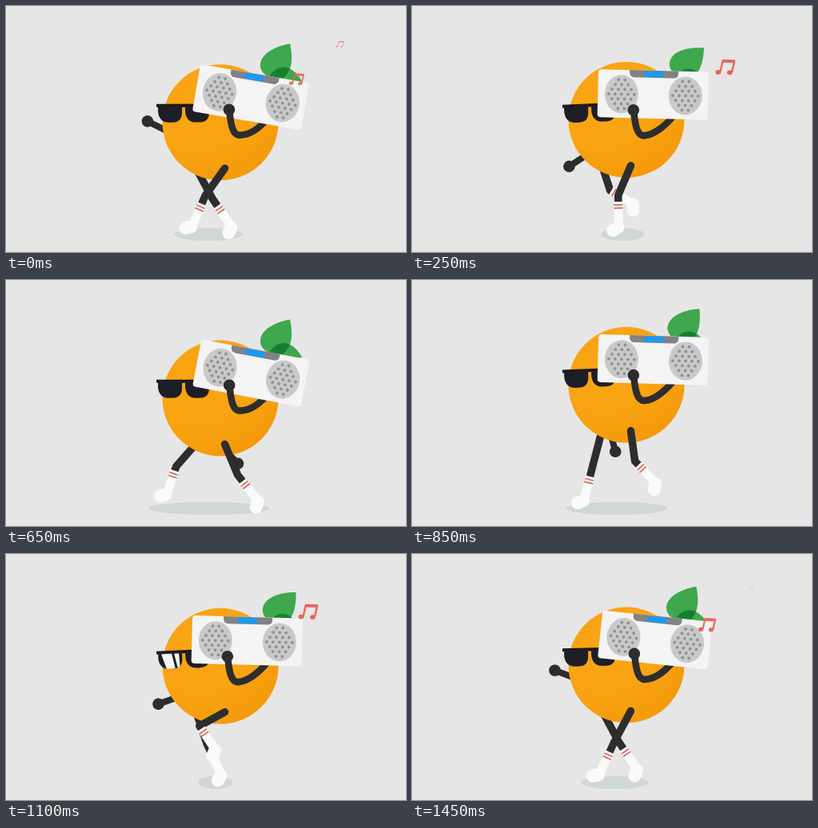
Write an HTML page with a canvas that moves like this. It is 500 px wide and 308 px high and loops after 1.5 s.

```html
<!DOCTYPE html>
<html lang="en">
<head>
<meta charset="utf-8">
<title>Walking orange</title>
<style>
html, body { margin: 0; width: 100%; height: 100%; overflow: hidden; background: #e6e6e6; }
canvas { display: block; }
</style>
</head>
<body>
<canvas id="stage" width="500" height="308"></canvas>
<script>
const ctx = document.getElementById('stage').getContext('2d');
const LOOP = 1500, STEP = 50, STRIDE = 1400;
const DARK = '#2d2d2e', RED = '#e8655c', WHITE = '#fafafa';

const { PI, sin, cos, hypot, atan2, min, max } = Math;
const turn = (t, period) => 2 * PI * t / period;
// Rises from 0 to 1 and back once per step, peaking at the given time.
const pulse = (t, peak, sharpness) =>
  ((1 + cos(turn(t - peak, STRIDE / 2))) / 2) ** sharpness;

function at(x, y, degrees, draw) {
  ctx.save();
  ctx.translate(x, y);
  ctx.rotate(degrees * PI / 180);
  draw();
  ctx.restore();
}

function ellipse(x, y, rx, ry, color) {
  ctx.fillStyle = color;
  ctx.beginPath();
  ctx.ellipse(x, y, rx, ry, 0, 0, 2 * PI);
  ctx.fill();
}

function stroke(path, color, width, cap = 'round') {
  ctx.strokeStyle = color;
  ctx.lineWidth = width;
  ctx.lineCap = cap;
  ctx.lineJoin = 'round';
  ctx.stroke(new Path2D(path));
}

function fill(path, color) {
  ctx.fillStyle = color;
  ctx.fill(new Path2D(path));
}

// Foot position: time counts from contact; snap sharpens the forward swing.
function foot(time, x, snap) {
  const a = turn(time, STRIDE), c = cos(a);
  return { x: x - 42 * c - snap * c * c, y: 277 - 33 * max(0, -sin(a)) };
}

function leg(hipX, hipY, { x, y }, bend) {
  const dx = x - hipX, dy = y - hipY, d = hypot(dx, dy);
  const out = max(0, 92 - d) * bend;
  const kneeX = hipX + dx / 2 - dy / d * out, kneeY = hipY + dy / 2 + dx / d * out;
  stroke(`M${hipX},${hipY}L${kneeX},${kneeY}L${x},${y}`, DARK, 9.5);
  at(x, y, atan2(y - kneeY, x - kneeX) * 180 / PI - 90, () => {
    stroke('M0,-32V0', WHITE, 11, 'butt');
    stroke('M-1,0L-7,4', WHITE, 16);
    stroke('M-5.5,-28H5.5M-5.5,-24H5.5', '#d9665f', 1.7, 'butt');
  });
}

function swingingArm(x, y, t) {
  const swing = cos(turn(t + 45, STRIDE));
  const angle = (37 + 81 * swing) * PI / 180, reach = 52 + 20 * swing ** 4;
  const handX = x - reach * sin(angle), handY = y + reach * cos(angle);
  stroke(`M${x},${y}L${handX},${handY}`, DARK, 8);
  ellipse(handX, handY, 7.3, 7.3, DARK);
}

function orange(y) {
  const skin = ctx.createRadialGradient(240, y - 40, 70, 240, y - 40, 125);
  skin.addColorStop(0, '#f9a413');
  skin.addColorStop(1, '#f4990a');
  ellipse(268, y, 72.5, 72.5, skin);
}

function leaves(y, tilt) {
  at(340, y, tilt, () => {
    const big = new Path2D('M2,4C-34,-2 -30,-34 15,-42C20,-18 16,-4 2,4Z');
    const small = new Path2D('M-10,-2C0,-18 18,-16 30,5C18,12 0,8 -10,-2Z');
    ctx.fillStyle = '#3fa74d';
    ctx.fill(big);
    ctx.fill(small);
    ctx.clip(big);
    ctx.fillStyle = '#14802f';
    ctx.fill(small);
  });
}

function glasses(y, tilt, shine) {
  at(220, y, tilt, () => {
    stroke('M-32,0H32', '#17171b', 4, 'butt');
    for (const x of [0, 34]) at(x, 0, 0, () => {
      const lens = new Path2D('M-30,0H0V8C0,18 -5,21 -13,21H-17C-25,21 -29,16 -30,8Z');
      ctx.fillStyle = '#1e1e26';
      ctx.fill(lens);
      ctx.clip(lens);
      ctx.translate(shine - x, 0);
      fill('M-26,2H-13L-9,21H-20ZM-10,2H-4L-3,21H-6Z', '#f5f5f5');
    });
  });
}

function speaker(x) {
  ellipse(x, 0.5, 21, 24, '#c9c9c9');
  for (let row = -3; row <= 3; row++)
    for (let col = -2; col <= 2; col++) {
      const dx = (col + (row % 2 ? 0.5 : 0)) * 8, dy = row * 6;
      if (hypot(dx / 18, dy / 21) < 1) ellipse(x + dx, dy + 0.5, 1.9, 1.9, '#909090');
    }
}

function boombox() {
  ctx.fillStyle = '#f4f4f4';
  ctx.beginPath();
  ctx.roundRect(-69, -30, 138, 60, 4);
  ctx.fill();
  fill('M-30,-30H31V-26Q30,-21 25,-21H-24Q-29,-21 -30,-26Z', '#828284');
  fill('M-12,-29H12V-22H-12Z', '#169cf4');
  speaker(-39.5);
  speaker(40.5);
}

function carry(cy, tilt) {
  const x = 300.5 + tilt * 0.55, y = cy - 31.5, a = tilt * PI / 180;
  const gripX = x - 24 * cos(a) - 20 * sin(a), gripY = y - 24 * sin(a) + 20 * cos(a);
  const low = gripY + 32, elbow = `${gripX + 13},${low}`;
  stroke(`M${elbow}C${gripX + 22},${low} 313,${cy + 12} 327,${cy - 5}`, DARK, 8.5);
  at(x, y, tilt, boombox);
  stroke(`M${gripX},${gripY}C${gripX + 2},${gripY + 14} ${gripX + 3},${low} ${elbow}`, DARK, 8.5);
  ellipse(gripX, gripY, 7.3, 7.3, DARK);
}

function note(time, start, life, x, y, vx, vy) {
  const age = (time - start + STRIDE) % STRIDE;
  if (age >= life) return;
  const size = sin(PI * age / life);
  at(x + vx * age, y - vy * age, 2, () => {
    ctx.globalAlpha = min(1, size * 1.15);
    ctx.scale(size * 0.93, size * 0.93);
    stroke('M-6,7L-3,-8.5H13L10,7', RED, 2.6);
    stroke('M-3,-7.5H13', RED, 4, 'butt');
    ellipse(-9, 8, 3.8, 3.2, RED);
    ellipse(7, 8, 3.8, 3.2, RED);
  });
}

function draw(time) {
  const t = time % STRIDE;
  const cy = 140 + 7.5 * cos(turn(t + 40, STRIDE / 4)) - 1.5 * sin(turn(t, STRIDE / 2));
  const tilt = 1.5 + 9.5 * pulse(t, -35, 5);
  const leafTilt = 16 * pulse(t, 300, 2);
  const front = foot(t + 15, 274, 0), back = foot(t + 695, 262, 22);
  const left = min(front.x, back.x) - 22, right = max(front.x, back.x) + 14;

  ctx.fillStyle = '#e6e6e6';
  ctx.fillRect(0, 0, 500, 308);
  ellipse((left + right) / 2, 286, (right - left) / 2, 8, '#cfd8d5');
  swingingArm(240, cy + 30, t);
  leg(237.5, cy + 57, back, 0.4);
  orange(cy);
  leaves(cy - 56.5 + leafTilt * 0.25, leafTilt);
  leg(273.5, cy + 57.5, front, 0.62);
  glasses(cy - 17.5 - tilt * 0.35, tilt * 0.25 - 2.8, (t - 1100) * 0.3);
  carry(cy, tilt);
  note(t, 1180, 820, 338, 105, 0.113, 0.062);
  note(t, 820, 670, 340, 94, 0.133, 0.08);
}

function tick(now) {
  draw(Math.floor(now / STEP) * STEP % LOOP);
  requestAnimationFrame(tick);
}
tick(0);
</script>
</body>
</html>
```
